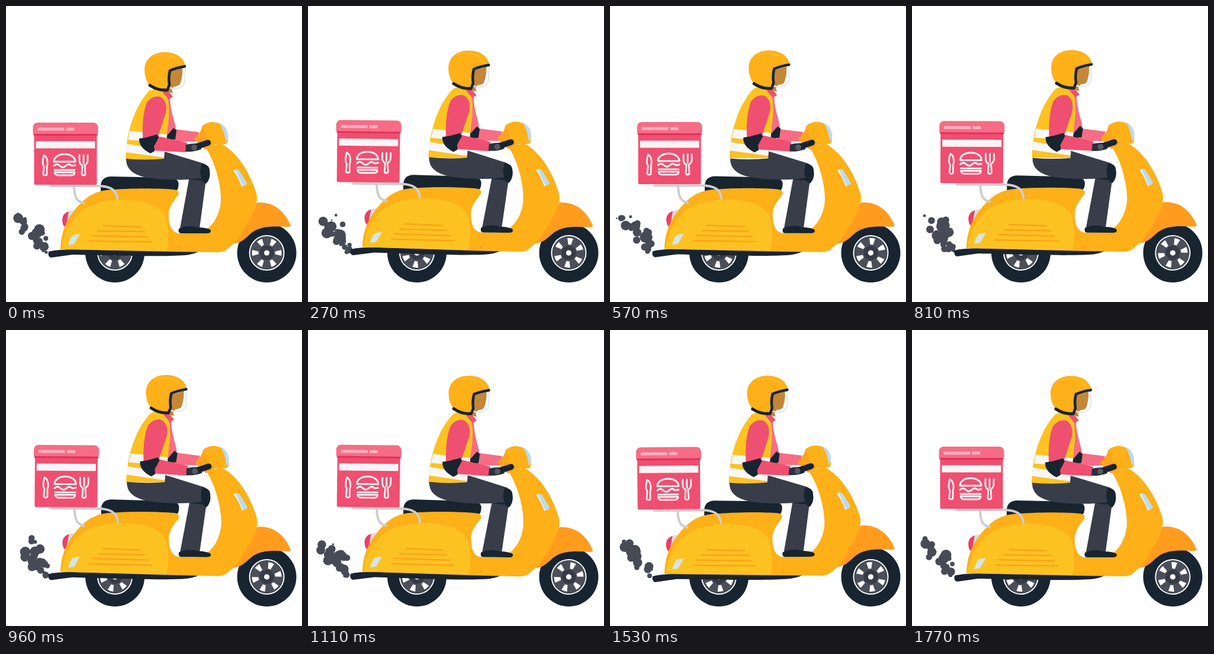
These frames come from a looping animation (500 by 500 pixels, 1800 ms). An HTML page with a canvas:

```html
<!DOCTYPE html>
<html lang="en">
<head>
<meta charset="utf-8">
<title>Delivery scooter</title>
<style>
html, body { margin: 0; width: 100%; height: 100%; overflow: hidden; background: #fff; }
canvas { display: block; width: 500px; height: 500px; }
</style>
</head>
<body>
<canvas id="stage" width="500" height="500"></canvas>
<script>
const ctx = document.getElementById('stage').getContext('2d');
const LOOP = 1800, STEP = 30, TAU = Math.PI * 2;
const NAVY = '#182430', PANTS = '#383d49', PINK = '#ef4f70', LIGHT_PINK = '#f66d85',
  YELLOW = '#fdb017', SUN = '#fcc222', ORANGE = '#ff9c1e', WHITE = '#f7f7f8', GREY = '#cdcdcf';

// Pose keys over the loop: time, tilt, chassis bob, load bob, rider bob
const KEYS = [
  [0, 0, 0, 0, 0],
  [270, .011, -2, -.5, -.9],
  [570, .001, -.4, -.5, -2.5],
  [810, .004, -1.4, -.6, -2.2],
  [1110, .012, -1, 0, 0],
  [1320, -.015, -.6, 0, 0],
  [1770, 0, 0, 0, -.6],
  [1800, 0, 0, 0, 0]
];

function pose(t) {
  let i = 0;
  while (i < KEYS.length - 2 && t >= KEYS[i + 1][0]) i++;
  const a = KEYS[i], b = KEYS[i + 1];
  const u = (t - a[0]) / (b[0] - a[0]), e = (1 - Math.cos(Math.PI * u)) / 2;
  return a.map((v, k) => v + (b[k] - v) * e);
}

const fill = (d, color) => { ctx.fillStyle = color; ctx.fill(new Path2D(d)); };

function line(d, color, width, cap = 'round') {
  ctx.strokeStyle = color;
  ctx.lineWidth = width;
  ctx.lineCap = cap;
  ctx.lineJoin = 'round';
  ctx.stroke(new Path2D(d));
}

function disc(x, y, r, color) {
  ctx.fillStyle = color;
  ctx.beginPath();
  ctx.arc(x, y, r, 0, TAU);
  ctx.fill();
}

function block(x, y, w, h, r, color) {
  ctx.fillStyle = color;
  ctx.beginPath();
  ctx.roundRect(x, y, w, h, r);
  ctx.fill();
}

function shifted(dy, draw) {
  ctx.save();
  ctx.translate(0, dy);
  draw();
  ctx.restore();
}

const rand = n => { const s = Math.sin(n * 127.1 + 11.7) * 43758.5453; return s - Math.floor(s); };

function smoke(t) {
  const count = 66, life = 720;
  for (let i = 0; i < count; i++) {
    const born = i * LOOP / count;
    if (born > 1400 && born < 1520) continue;
    const p = ((t - born + LOOP) % LOOP) / life;
    if (p >= 1) continue;
    const a = rand(i) - .5, b = rand(i + 70) - .5, size = 4 + 6 * rand(i + 140);
    const x = 68 - 38 * p + a * 46 * Math.sqrt(p);
    const y = 416 - 60 * p + b * 24 * Math.sqrt(p);
    disc(x, y, size * Math.min(1, .5 + p) * Math.min(1, (1 - p) * 8), '#474b56');
  }
}

function wheel(x, y, turn) {
  disc(x, y, 50, NAVY);
  ctx.save();
  ctx.translate(x, y);
  ctx.rotate(turn);
  ctx.strokeStyle = '#fff';
  ctx.lineWidth = 2;
  ctx.beginPath();
  ctx.arc(0, 0, 29, 0, TAU);
  ctx.stroke();
  disc(0, 0, 27.5, '#4b4f59');
  for (let i = 0; i < 6; i++) {
    ctx.rotate(TAU / 6);
    ctx.fillStyle = '#fff';
    ctx.beginPath();
    ctx.arc(0, 0, 25, -.2, .2);
    ctx.arc(0, 0, 14, .17, -.17, true);
    ctx.fill();
  }
  disc(0, 0, 12, '#363b46');
  disc(0, 0, 4.6, '#fff');
  ctx.restore();
}

function chassis() {
  fill('M72 415C85 411 110 411 150 410L326 412C328 416 313 420 302 421C260 424 170 421 112 420L76 425Q70 423 72 415Z', NAVY);
  fill('M101 350Q108 344 121 346L113 370L99 374Z', '#dcdce0');
  fill('M106 347Q96 350 95 360Q95 372 101 374L104 358Z', '#ea3f68');
  fill('M160 308C159 294 166 288 178 288L275 290C291 291 293 297 291 306C290 314 282 314 270 314L190 318L160 314Z', NAVY);
  fill('M376 402C400 390 403 343 425 332C458 330 474 354 481 371Q480 374 472 373C448 372 430 372 415 383C401 395 397 402 376 402Z', ORANGE);
  fill(`M92 411C92 388 100 364 115 346C130 327 145 314 170 311C215 307 260 308 284 310
    Q294 312 291 319C280 333 273 343 275 358C276 374 282 384 294 384L322 384
    C346 382 363 352 363 326C363 298 351 258 336 238L364 233
    C392 248 413 283 423 317C427 333 417 352 406 370C396 388 388 399 378 407
    Q370 416 358 416L280 415L96 411Z`, YELLOW);
  fill('M94 411C96 392 103 375 113 362C126 343 148 330 185 328C230 326 260 335 269 355C276 372 275 398 271 414L96 411Z', SUN);
  line('M164 371L227 373M155 380L234 381M146 388L240 390M141 397L246 398.5', '#fba41b', 2.5);
  fill('M113 387L125 385L115 402L105 404Q107 393 113 387Z', '#d5e5e8');
  fill('M384 278Q389 273 394 278L407 299Q407 303 398 305Q393 290 384 278Z', '#bfdaec');
  fill('M384 278L387 276L400 304L398 305Q393 290 384 278Z', '#e7f0f4');
  disc(292, 409, 2, '#f8a01b');
}

function rack() {
  line('M75 304H150C177 303 187 311 188 326', GREY, 4);
  line('M115 306C116 323 119 330 131 333', GREY, 4);
}

function crate() {
  block(47.5, 212, 106, 90, 2, PINK);
  block(45.5, 197, 110, 20, [8, 8, 2, 2], LIGHT_PINK);
  block(46.5, 216, 108, 3, 1, '#e3315b');
  block(53.5, 205.5, 45, 5, 1, '#fab1bf');
  block(101.5, 205.5, 14, 5, 1, '#fab1bf');
  block(50.5, 228.5, 100, 12, 0, '#faf4f5');
  const c = '#fff2f4';
  line('M64 252Q71 256 70 268L69 271V284Q69 286 66 286Q62 286 63 282L64 271Q60 266 64 252Z', c, 2.8);
  line('M81 263C81 246 117 246 117 263Z', c, 3);
  line('M81 270Q86 265 91 270T101 270T111 270L117 269', c, 3);
  line('M82 277H116M82 281Q83 286 88 286H110Q116 286 116 281Z', c, 2.8);
  line('M124 252V262Q125 268 129 269L128 283Q128 286 131 286Q134 286 134 283L133 269Q137 267 138 262V252M131 252V266', c, 2.8);
}

function farArm() {
  fill('M284 208L326 213L322 229L282 229Z', LIGHT_PINK);
}

function torso() {
  fill('M262 145L270 143L277 156C278 180 286 196 287 208L270 228L250 222Z', LIGHT_PINK);
  fill('M283 206L288 210L286 225L270 228L271 220Z', NAVY);
  fill('M242 143Q254 137 268 143C275 153 276 170 275 190L267 260L202 260C202 222 214 173 242 143Z', SUN);
  fill('M209 211L272 217L271 231L206 226Z', WHITE);
  fill('M204 233L269 243L267 256L202 247Z', WHITE);
}

function nearArm() {
  fill('M238 163Q249 149 262 154Q273 162 270 180L257 220L306 231L303 247L248 244Q231 239 231 222C230 199 232 178 238 163Z', PINK);
  fill('M225 224L237 222L255 217L258 222L250 237L251 245L244 249Q224 239 225 224Z', NAVY);
}

function legs() {
  fill('M203 258Q235 261 267 258L268 246L334 266Q346 273 344 287L337 300L327 375L294 375L309 293Q270 295 238 290Q202 283 203 258Z', PANTS);
  fill('M330 267Q344 267 344 279Q346 292 338 300Q330 297 330 290L328 281Z', NAVY);
  fill('M309 293L331 291L330 295Z', NAVY);
  fill('M292 376Q308 369 325 374Q346 375 346 380Q346 384 339 384H296Q290 384 292 376Z', NAVY);
}

function head() {
  fill('M270 138L285 134L280 142L282 147L270 145Z', '#bd8339');
  fill('M276 111L298 105Q299 119 294 132Q291 137 276 136Z', '#c38737');
  fill('M264 145L271 141L282 153L275 158Z', PINK);
  line('M302 104V125Q302 134 294 138Q287 141 276 138', '#e5eaf3', 2.4);
  fill('M234 108C234 89 249 78 268 78C289 78 301 89 303 101L277 110L274 140Q258 142 243 134Q234 124 234 108Z', YELLOW);
  line('M250 84Q286 79 295 98', '#fcb922', 3);
  line('M243 134Q256 143 272 142', NAVY, 5);
  line('M302 102Q286 105 277 109Q274 120 276 133L273 141', NAVY, 4.5);
}

function steering() {
  fill('M318 224Q330 214 332 202Q346 192 362 199L374 218Q376 231 372 233L347 235L336 242Q326 236 318 224Z', YELLOW);
  fill('M318 224Q330 214 332 202L340 225L352 234L336 242Z', '#fda41d');
  fill('M361 198Q369 200 374 212Q377 222 371 230Q370 214 361 198Z', '#bcd9f0');
  fill('M304 234Q317 231 329 233L330 242Q317 247 303 246Z', '#2b313c');
  line('M320 238L341 231', NAVY, 10);
  disc(318, 239, 5, '#545862');
}

function draw(t) {
  const [, tilt, bob, load, rider] = pose(t);
  const turn = t / LOOP * TAU * 4;
  ctx.fillStyle = '#fff';
  ctx.fillRect(0, 0, 500, 500);
  smoke(t);
  wheel(184, 417, turn);
  wheel(440.5, 417, turn);

  ctx.save();
  ctx.translate(247, 400 + bob);
  ctx.rotate(tilt);
  ctx.translate(-247, -400);
  chassis();
  shifted(load * .6, rack);
  shifted(load, crate);
  farArm();
  shifted(rider, torso);
  legs();
  shifted(rider, head);
  shifted(rider * .5, nearArm);
  steering();
  ctx.restore();
}

const start = performance.now();
function tick() {
  const t = (performance.now() - start) % LOOP;
  draw(Math.floor(t / STEP) * STEP);
  requestAnimationFrame(tick);
}
tick();
</script>
</body>
</html>
```
